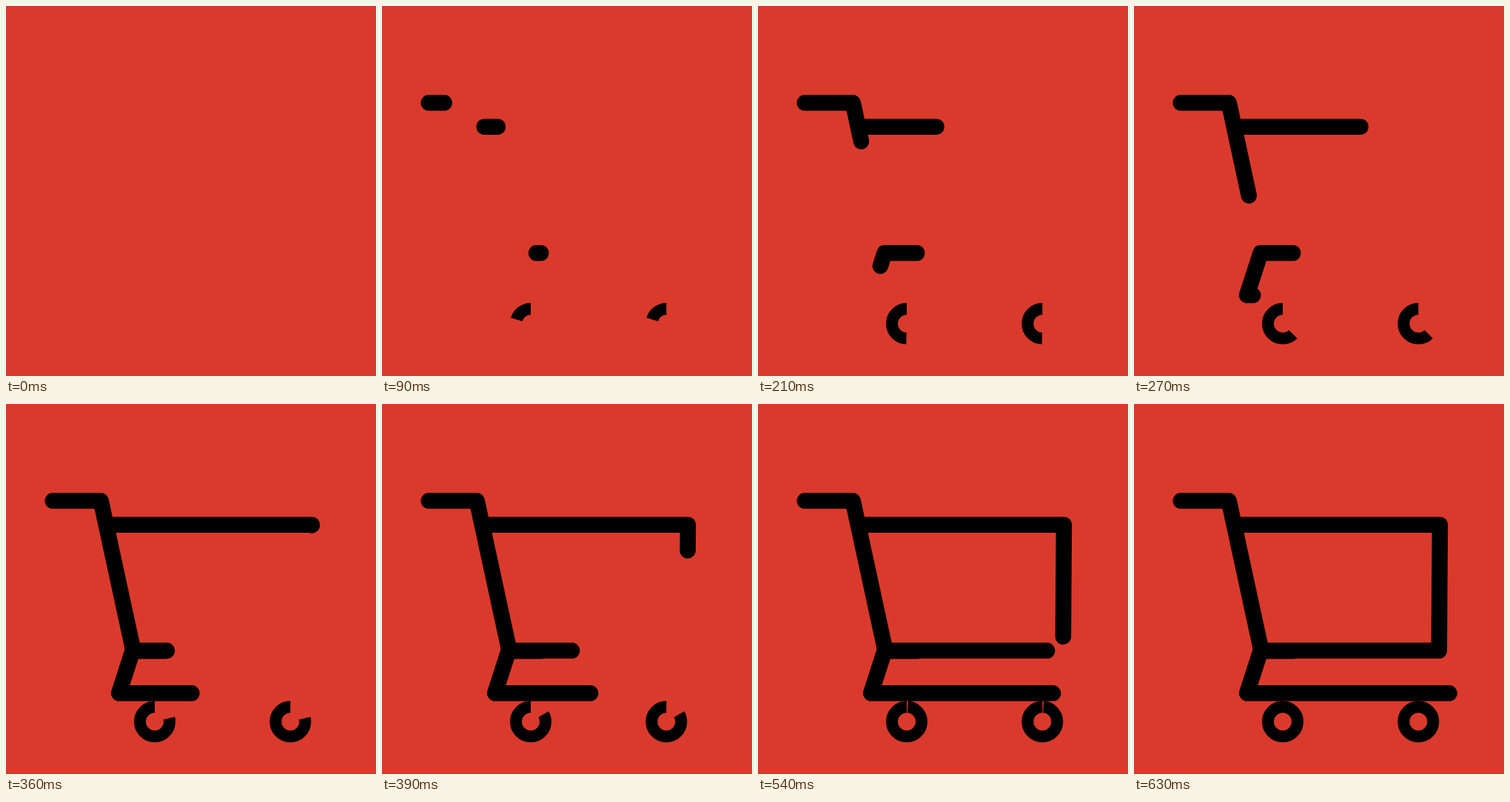
Recreate the animation shown at these times as an HTML page. Size 500 by 500 pixels, loop 1.83 s.

```html
<!DOCTYPE html>
<html lang="en">
<head>
<meta charset="utf-8">
<title>Shopping cart</title>
<style>
  html, body { margin: 0; width: 100%; height: 100%; overflow: hidden; background: #da3a2b; }
  svg { display: block; width: 100%; height: 100%; }
  path { fill: none; stroke: #000; stroke-width: 21.5; stroke-linecap: round; stroke-linejoin: round; }
  .wheel { stroke-width: 16; stroke-linecap: butt; }
</style>
</head>
<body>
<svg viewBox="0 0 500 500">
  <path class="frame" pathLength="1" d="M63.2 130.8H128.2L172 333.3H412"/>
  <path class="frame" pathLength="1" d="M138.2 163.2H413.4L412.3 333"/>
  <path class="base" pathLength="1" d="M214.7 333.8H171L152.6 390.8H428"/>
  <path class="wheel" pathLength="1" d="M201 429.3m0 -20a20 20 0 0 0 0 40a20 20 0 0 0 0 -40"/>
  <path class="wheel" pathLength="1" d="M384.3 429.3m0 -20a20 20 0 0 0 0 40a20 20 0 0 0 0 -40"/>
</svg>
<script>
  const LOOP = 1830, STEP = 30, DRAWN = 630;

  // Cubic easing with control points (x1, 0) and (x2, 1)
  const bezier = (x1, x2) => x => {
    if (x <= 0) return 0;
    if (x >= 1) return 1;
    let lo = 0, hi = 1, s;
    for (let i = 0; i < 24; i++) {
      s = (lo + hi) / 2;
      const at = 3 * x1 * s * (1 - s) ** 2 + 3 * x2 * s * s * (1 - s) + s ** 3;
      if (at < x) lo = s; else hi = s;
    }
    return s * s * (3 - 2 * s);
  };
  const easeInOut = bezier(0.42, 0.58), easeOut = bezier(0, 0.58);

  const strokes = {
    frame: { start: 0, duration: 631, ease: easeInOut },
    base: { start: 33, duration: 630, ease: easeInOut },
    wheel: { start: 17, duration: 569, ease: easeOut }
  };
  const paths = document.querySelectorAll('path');

  function draw(now) {
    const t = Math.min(Math.floor(now % LOOP / STEP) * STEP, DRAWN);
    for (const path of paths) {
      const { start, duration, ease } = strokes[path.getAttribute('class')];
      const part = ease((t - start) / duration);
      path.style.visibility = part > 0 ? 'visible' : 'hidden';
      path.setAttribute('stroke-dasharray', part < 1 ? `${part} 2` : 'none');
    }
  }

  const begin = performance.now();
  function tick() {
    draw(performance.now() - begin);
    requestAnimationFrame(tick);
  }
  tick();
</script>
</body>
</html>
```
